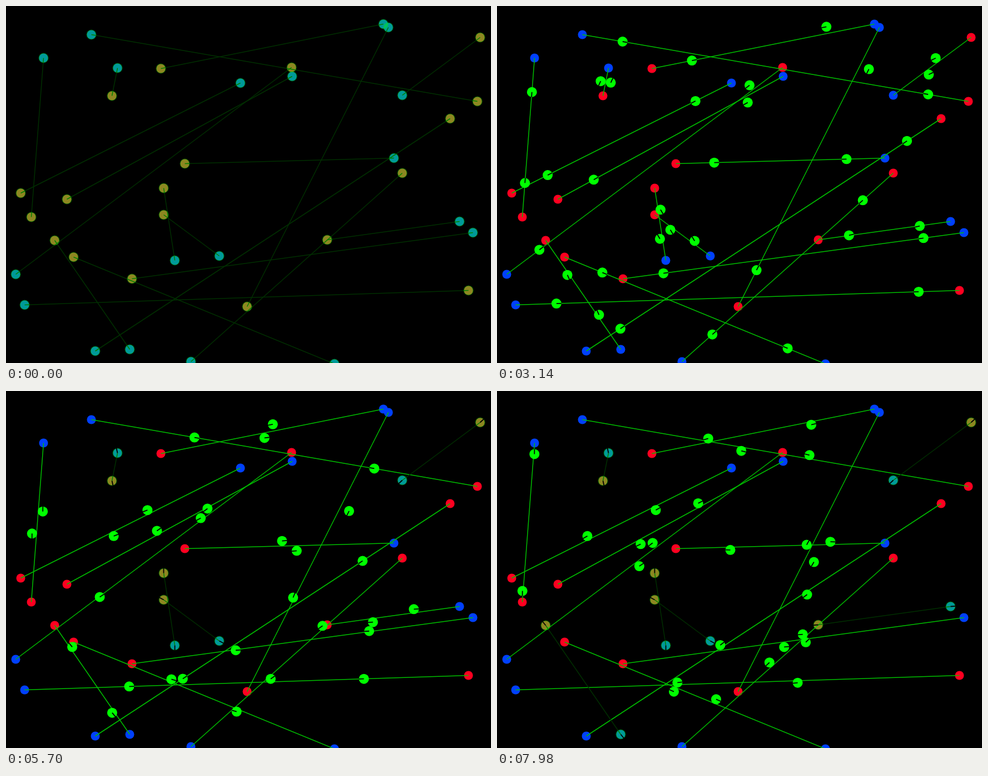
An HTML page with a canvas for the animation above (8000 ms loop, 872 px wide and 642 px high).

```html
<!DOCTYPE html>
<html>
<head>
<meta charset="utf-8">
<style>
  html, body { margin: 0; width: 100%; height: 100%; overflow: hidden; background: #000; }
  canvas { display: block; }
</style>
</head>
<body>
<canvas width="872" height="642"></canvas>
<script>
const ctx = document.querySelector('canvas').getContext('2d');
const LOOP = 8, START = 0.87, SPEED = 45.2, SPIN_UP = 0.67;
const SIDESTEP = 9.5, CROWD_DISTANCE = 28;
const TAU = Math.PI * 2;

// Two agents swap places along each route: red x, y, blue x, y.
// Routes are grouped by the side on which the agents dodge each other.
const RIGHT = [
  [847, 171, 153, 51], [278, 112, 678, 32], [190, 161, 200, 111],
  [45, 379, 67, 93], [26, 336, 421, 138], [513, 110, 17, 482],
  [712, 300, 332, 639], [226, 490, 839, 407], [283, 375, 383, 449]
];
const LEFT = [
  [433, 540, 687, 38], [109, 347, 514, 126], [321, 283, 697, 273],
  [798, 202, 160, 620], [577, 420, 815, 387], [831, 511, 33, 537],
  [121, 451, 590, 643], [283, 327, 303, 457]
];
const RIGHT_UNBRAKED = [[852, 56, 712, 160], [87, 421, 222, 617]];

const smooth = u => {
  u = Math.min(1, Math.max(0, u));
  return u * u * (3 - 2 * u);
};

function cruise(t) {
  const run = Math.max(0, t - START);
  return SPEED * (run - SPIN_UP * (1 - Math.exp(-run / SPIN_UP)));
}

const routes = [
  ...RIGHT.map(ends => ({ ends, turn: 1, brakes: true })),
  ...LEFT.map(ends => ({ ends, turn: -1, brakes: true })),
  ...RIGHT_UNBRAKED.map(ends => ({ ends, turn: 1, brakes: false }))
];
const starts = routes.flatMap(({ ends: [rx, ry, bx, by] }) => [[rx, ry], [bx, by]]);

// Displacement away from a neighbour that starts too close, or null.
function crowdPush(x, y) {
  for (const [nx, ny] of starts) {
    const gap = Math.hypot(x - nx, y - ny);
    if (gap > 0 && gap < CROWD_DISTANCE) {
      const scale = (CROWD_DISTANCE - gap) / gap;
      return [(x - nx) * scale, (y - ny) * scale];
    }
  }
  return null;
}

function makeAgent(x, y, goalX, goalY, turn, delay) {
  const length = Math.hypot(goalX - x, goalY - y);
  const ux = (goalX - x) / length, uy = (goalY - y) / length;
  const pass = START + SPIN_UP + (length / 2 + delay) / SPEED;
  const push = crowdPush(x, y);
  const shift = push ? push[1] * ux - push[0] * uy : turn * SIDESTEP;
  const ahead = push ? push[0] * ux + push[1] * uy : 0;

  const swerve = t => push ? smooth((t - START) / 1.3) : smooth((t / pass - 0.6) / 0.4);
  const travelled = t => {
    const braked = delay * smooth((t - 0.4 * pass + 0.3) / 2.7);
    return Math.min(length, Math.max(0, cruise(t) - braked + ahead * swerve(t)));
  };
  const position = t => {
    const s = travelled(t);
    const homing = Math.min(1, (length - s) / (length - travelled(pass)));
    const side = shift * swerve(t) * homing;
    return [x + ux * s - uy * side, y + uy * s + ux * side];
  };

  let arrival = START;
  while (arrival < LOOP + 1 && travelled(arrival) < length) arrival += 0.01;

  const pose = t => {
    const now = Math.min(t, arrival);
    const [px, py] = position(now), [qx, qy] = position(now - 0.1);
    return { x: px, y: py, angle: Math.atan2(py - qy + uy * 0.01, px - qx + ux * 0.01) };
  };
  return { pose, arrival };
}

const pairs = routes.map(({ ends: [rx, ry, bx, by], turn, brakes }) => {
  const crowded = crowdPush(rx, ry) || crowdPush(bx, by);
  // The shorter the route, the more the two hold each other up.
  const delay = brakes && !crowded
    ? Math.max(0, 60 - Math.hypot(bx - rx, by - ry) / 8) : 0;
  const agents = [
    makeAgent(rx, ry, bx, by, turn, delay),
    makeAgent(bx, by, rx, ry, turn, delay)
  ];
  const end = Math.max(agents[0].arrival, agents[1].arrival);
  return { rx, ry, bx, by, agents, idle: t => t < START || t >= end };
});

function disc(x, y, radius, color) {
  ctx.fillStyle = color;
  ctx.beginPath();
  ctx.arc(x, y, radius, 0, TAU);
  ctx.fill();
}

function stroke(x1, y1, x2, y2, color, width) {
  ctx.strokeStyle = color;
  ctx.lineWidth = width;
  ctx.beginPath();
  ctx.moveTo(x1, y1);
  ctx.lineTo(x2, y2);
  ctx.stroke();
}

function draw(t) {
  ctx.setTransform(1, 0, 0, 1, 0, 0);
  ctx.fillStyle = '#000';
  ctx.fillRect(0, 0, 872, 642);
  ctx.translate(0.5, 0.5);

  for (const p of pairs) {
    const idle = p.idle(t);
    disc(p.rx, p.ry, 8, idle ? 'rgb(235,55,55)' : 'rgb(255,0,32)');
    disc(p.bx, p.by, 8, idle ? 'rgb(0,88,255)' : 'rgb(0,64,255)');
  }
  for (const p of pairs)
    stroke(p.rx, p.ry, p.bx, p.by, p.idle(t) ? 'rgb(0,46,0)' : 'rgb(0,190,0)', 1.5);

  for (const p of pairs) {
    const color = p.idle(t) ? 'rgba(0,255,0,.4)' : 'rgb(0,255,0)';
    for (const agent of p.agents) {
      const { x, y, angle } = agent.pose(t);
      disc(x, y, 9, color);
      if (t >= START)
        stroke(x, y, x + 9 * Math.cos(angle), y + 9 * Math.sin(angle), '#000', 1.8);
    }
  }
}

const origin = performance.now();
function tick() {
  draw((performance.now() - origin) / 1000 % LOOP);
  requestAnimationFrame(tick);
}
tick();
</script>
</body>
</html>
```
